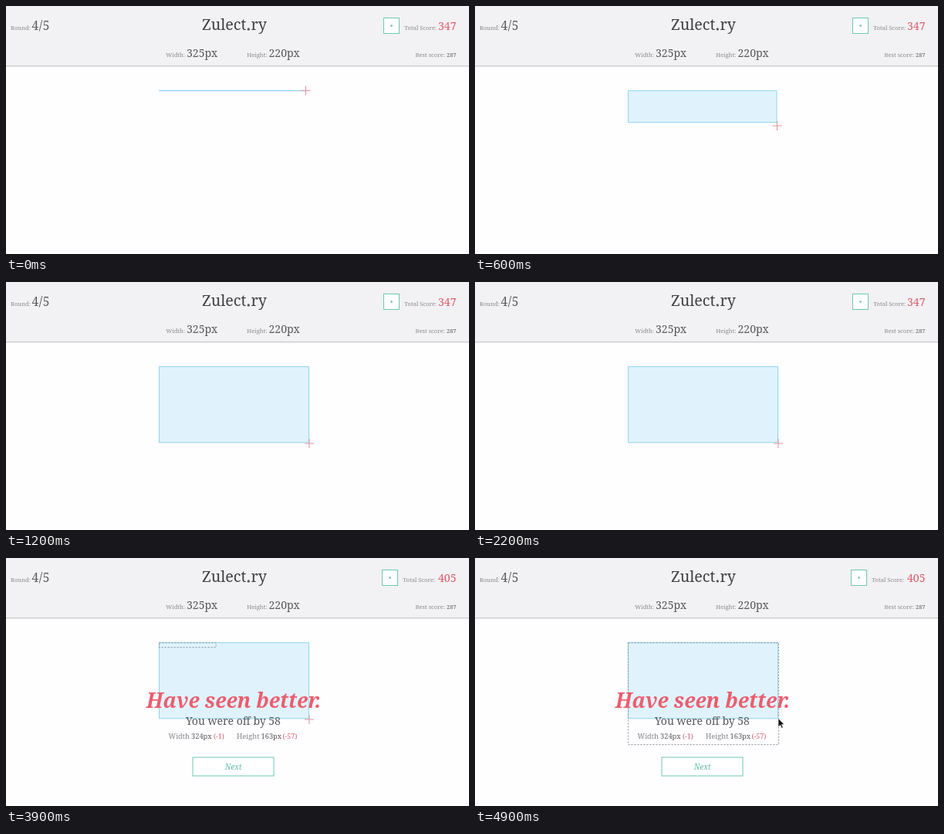
An HTML page for the animation above (5 s loop, 600 by 321 pixels).

```html
<!DOCTYPE html>
<html lang="en">
<head>
<meta charset="utf-8">
<title>Size guessing game</title>
<style>
  html, body { margin: 0; width: 100%; height: 100%; overflow: hidden; background: #fefdff; }
  svg { display: block; width: 600px; height: 321px; }
  text { font-family: "Noto Serif", "Liberation Serif", serif; fill: #58575a; }
  .title text { font-size: 19.7px; font-weight: 300; fill: #414043; }
  .label { font-size: 7.6px; fill: #8b8a8d; }
  .value { font-size: 14px; }
  .round { font-size: 15.5px; letter-spacing: .6px; }
  .detail { font-size: 9.3px; }
  .detail .name { fill: #858487; }
  .detail .diff { font-size: 8.9px; fill: #cf6470; }
  .red { fill: #dc5a6a; }
  .verdict { font-size: 26.5px; font-weight: bold; font-style: italic; fill: #ec5d6e; }
  .green { fill: #fff; stroke: #6dc9b1; }
  .middle { text-anchor: middle; }
  .end { text-anchor: end; }
</style>
</head>
<body>
<svg viewBox="0 0 600 321">
  <rect width="600" height="77" fill="#f2f1f3"/>
  <rect y="77" width="600" height="1.3" fill="#c9c8ca"/>
  <rect y="78.3" width="600" height="1" fill="#efeef0"/>

  <g class="title">
    <text class="end" x="311.5" y="31">Zulect</text>
    <circle cx="314.3" cy="30" r="1.7" fill="#5a595c"/>
    <text x="317.5" y="31">ry</text>
  </g>

  <text class="label" x="6" y="31">Round:</text>
  <text class="round" x="33.5" y="31">4/5</text>
  <text class="label end" x="232" y="66">Width:</text>
  <text class="value" x="234" y="66">325px</text>
  <text class="label end" x="338.5" y="66">Height:</text>
  <text class="value" x="340.5" y="66">220px</text>
  <text class="label end" x="569" y="66">Best score:</text>
  <text class="end" x="583.5" y="66" font-size="7.4">287</text>

  <g id="scoreLabel">
    <rect class="green" x="489.5" y="15.5" width="20" height="20"/>
    <circle cx="499.5" cy="25.5" r="1.3" fill="#5fc4aa"/>
    <text class="label end" x="558.3" y="31">Total Score:</text>
  </g>
  <text id="score" class="value red end" x="583.5" y="31"></text>

  <rect id="drawn" x="198.6" y="109.7" fill="#c8ebfc" fill-opacity=".55" stroke="#84d2ee" stroke-width=".9"/>
  <rect id="answer" x="198.6" y="109.7" fill="none" stroke="#85878a" stroke-width=".9" stroke-dasharray="2 2"/>

  <g id="result">
    <text class="verdict middle" x="295" y="193.5">Have seen better.</text>
    <text class="middle" x="294.5" y="215.5" font-size="14">You were off by 58</text>
    <g class="detail">
      <text class="name end" x="238" y="234">Width</text>
      <text x="240" y="234">324px</text>
      <text class="diff" x="269" y="234">(-1)</text>
      <text class="name end" x="328.5" y="234">Height</text>
      <text x="330.5" y="234">163px</text>
      <text class="diff" x="358.5" y="234">(-57)</text>
    </g>
    <rect class="green" x="242" y="258" width="105" height="24"/>
    <text class="middle" x="294.5" y="273.5" font-size="10" font-style="italic" style="fill:#5fbfa6">Next</text>
  </g>

  <path id="cross" d="M-6 0H6M0 -6V6" stroke="#e08794" stroke-width=".9" fill="none"/>
  <path id="arrow" d="M393 207.5v11.2l2.6-2.4 1.8 4 1.8-.8-1.8-3.9h3.4z" fill="#111" stroke="#fff" stroke-width=".6"/>
</svg>
<script>
  const LOOP = 5000, STEP = 100, RESULT_AT = 3900, ARROW_AT = 4100;
  const LEFT = 198.6, TOP = 109.7;
  const el = id => document.getElementById(id);

  // Pointer position during the drag: [time, x, y]
  const drag = [
    [0, 388.5, 109.5], [300, 388.5, 109.5], [400, 389.5, 119], [600, 391.5, 155],
    [800, 392.5, 186], [900, 392.7, 197], [1000, 393, 203], [1200, 393, 209]
  ];

  function pointerAt(time) {
    const next = drag.findIndex(key => key[0] > time);
    if (next < 0) return drag[drag.length - 1].slice(1);
    const [t0, x0, y0] = drag[next - 1], [t1, x1, y1] = drag[next];
    const p = (time - t0) / (t1 - t0);
    return [x0 + (x1 - x0) * p, y0 + (y1 - y0) * p];
  }

  function setSize(rect, width, height) {
    rect.setAttribute("width", width);
    rect.setAttribute("height", height);
  }

  const show = (id, visible) => el(id).setAttribute("visibility", visible ? "visible" : "hidden");

  function render(time) {
    const t = Math.floor(time / STEP) * STEP;
    const done = t >= RESULT_AT;
    const [x, y] = pointerAt(t);

    // The drawn box trails slightly behind the pointer.
    const bottom = Math.min(pointerAt(Math.max(0, t - 25))[1], 207.8);
    setSize(el("drawn"), x - LEFT - .5, Math.max(.01, bottom - TOP));
    el("drawn").setAttribute("stroke", t < 400 ? "#5cc5ec" : "#84d2ee");
    el("cross").setAttribute("transform", `translate(${x} ${y})`);

    // The answer's outline eases towards its full size.
    const n = (t - RESULT_AT) / STEP;
    setSize(el("answer"), 195 * (1 - .623 * .37 ** n), 132 * (1 - .955 * .5 ** n));

    el("score").textContent = done ? "405" : "347";
    el("scoreLabel").setAttribute("transform", `translate(${done ? -2 : 0} 0)`);
    show("result", done);
    show("answer", done);
    show("cross", t < ARROW_AT);
    show("arrow", t >= ARROW_AT);
  }

  const start = performance.now();
  function frame() {
    render((performance.now() - start) % LOOP);
    requestAnimationFrame(frame);
  }
  frame();
</script>
</body>
</html>
```
